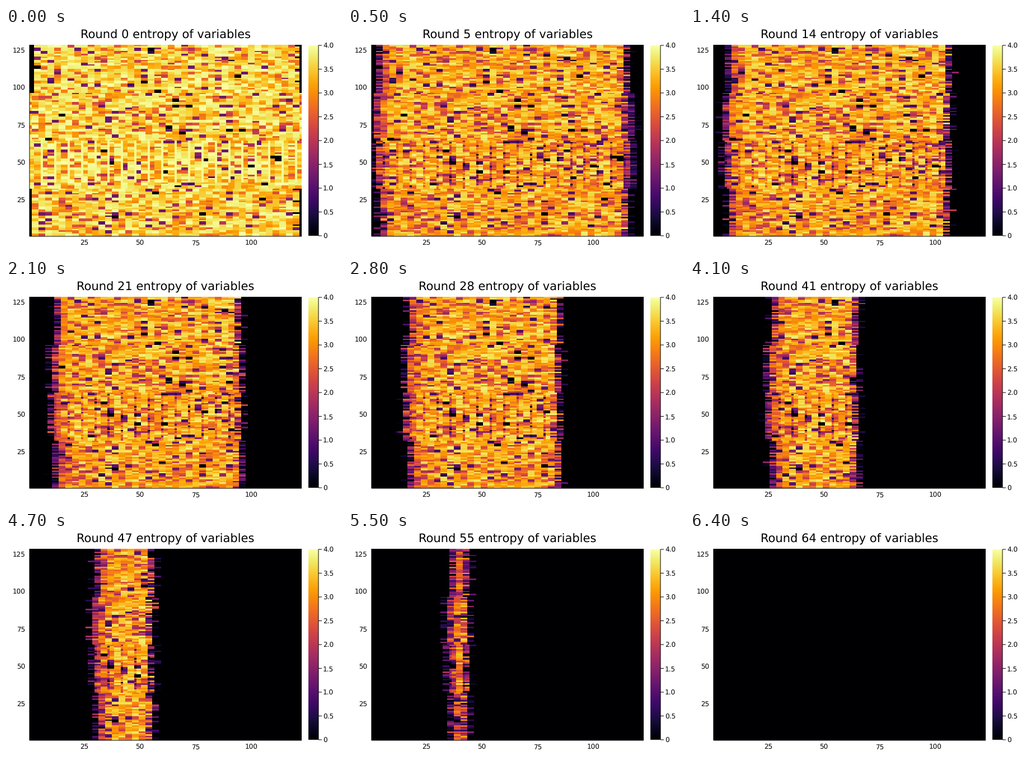
Write a matplotlib script that moves like this. It is 600 by 400 pixels and loops after 6500 ms.

```python
import numpy as np
import matplotlib.pyplot as plt
from matplotlib.animation import FuncAnimation

W, H, DPI = 600, 400, 100
ROWS, COLS, ROUNDS = 128, 122, 65
LEFT, RIGHT, TOP, BOTTOM = 42, 528, 30, 372
TITLE_PT, TICK_PT = 14.85, 8.45

# A few solid black words as (column, row).
BLACK = [(50, 103), (56, 97), (64, 87), (70, 87), (61, 73), (67, 69),
         (88, 71), (94, 71), (59, 43), (107, 53), (110, 53), (76, 15)]

rng = np.random.default_rng(12)
row, col = np.mgrid[0:ROWS, 0:COLS]

# Four bands of 32 rows, each made of three-column words.
band = row // 32
middle = (band == 1) | (band == 2)
offset = 1 + band % 2
word = (col - offset) // 3 + 1
start = offset + 3 * (word - 1)


def per_word(noise, pairs=False):
    """Spread one random number over each word, or over two rows of it."""
    table = noise((ROWS, 43))
    return table[row - row % 2 if pairs else row, word]


def words_loss(size):
    loss = rng.gamma(1.25, 0.48, size)
    pick = rng.random(size)
    loss[pick < 0.035] = 2.8
    loss[pick < 0.005] = 3.95
    return loss


paired = per_word(words_loss, True)
single = per_word(lambda s: rng.gamma(1.25, 0.48, s))
alone = per_word(rng.random, True) < 0.25
loss = np.where(alone & (paired < 2.5), single, paired)
for c, r in BLACK:
    loss[r - r % 2:r - r % 2 + 2, c:c + 3] = 3.97

drift = 0.12 + per_word(lambda s: rng.gamma(0.7, 0.3, s))
parity = np.where(row % 2, 0.2, -0.2)
jitter_left = parity + per_word(lambda s: rng.normal(0, 0.3, s))
jitter_right = parity + per_word(lambda s: rng.normal(0, 0.35, s))

# In the second band every other word has a separate first column.
split = (band == 1) & (col % 6 == 5)
drift += np.where(split, rng.gamma(0.8, 0.8, (ROWS, COLS)), 0)
stripes = split & (row > 33 + (col * 7) % 3)

dead = ~middle & ((word == 0) | (col == COLS - 1))
dead |= ~middle & (start >= 118) & (row % 8 == 7)


def entropy(n):
    """Entropy of every variable after n rounds."""
    lo = np.interp(n, [0, 5, 14, 63], [-7, 0.5, 4, 39])
    hi = np.interp(n, [0, 5, 14, 63], [128, 116, 107, 32.5])
    early = np.clip((14 - n) / 9, 0, 1) * middle
    a = (start - lo + np.where(middle, 1.2, -0.7)) / 3
    b = (hi + 3 * early - start) / 3
    rise = 1 - np.exp(-1.2 * np.maximum(a + 0.15 + jitter_left, 0))
    fall = np.clip((b - 0.65 + jitter_right) * (0.85 - 0.45 * early), 0, 1)
    if n == 0:
        rise = fall = 1
    elif n >= 63:
        rise = 0

    lost = np.where(stripes, loss * min(n / 3, 1) + 0.08, loss)
    value = np.clip(4 - lost - drift * min(n / 5, 1), 0, 4) * rise * fall
    return np.where(dead, 0, value)


plt.rcParams["font.family"] = "DejaVu Sans"
plt.rcParams["text.hinting"] = "none"
plt.rcParams["text.hinting_factor"] = 1
fig = plt.figure(figsize=(W / DPI, H / DPI), dpi=DPI, facecolor="white")
ax = fig.add_axes([0, 0, 1, 1])
ax.axis("off")

style = dict(cmap="inferno", origin="lower", aspect="auto",
             interpolation="nearest", vmin=0, vmax=4)
heat = ax.imshow(entropy(0), extent=(LEFT, RIGHT, BOTTOM, TOP), **style)
ax.imshow(np.linspace(0, 4, 256)[:, None], extent=(540, 558, 371, 31), **style)
ax.set_xlim(0, W)
ax.set_ylim(H, 0)


def line(x, y):
    ax.plot(x, y, color="black", lw=0.72, solid_capstyle="butt", snap=False)


def label(x, y, text, ha, va="center_baseline", size=TICK_PT):
    return ax.text(x, y, text, ha=ha, va=va, fontsize=size, color="black")


line([LEFT, LEFT], [TOP, BOTTOM])
line([LEFT, RIGHT], [BOTTOM, BOTTOM])
line([558, 558], [31, 371])

for v in range(25, 126, 25):
    y = BOTTOM - (v - 0.5) * (BOTTOM - TOP) / ROWS
    label(34.5, y + 0.5, str(v), "right")
    if v < COLS:
        x = LEFT + (v - 0.5) * (RIGHT - LEFT) / COLS
        label(x, 388, str(v), "center", "baseline")

for i in range(9):
    y = 371 - 42.5 * i
    line([558, 564], [y, y])
    label(566, y + 0.5, f"{i / 2:.1f}" if i else "0", "left")

title = label(284.7, 18.5, "", "center", "baseline", TITLE_PT)


def update(n):
    heat.set_data(entropy(n))
    title.set_text(f"Round {n} entropy of variables")
    return heat, title


anim = FuncAnimation(fig, update, frames=ROUNDS, interval=100,
                     repeat=True, repeat_delay=0, blit=False)
plt.show()
```
